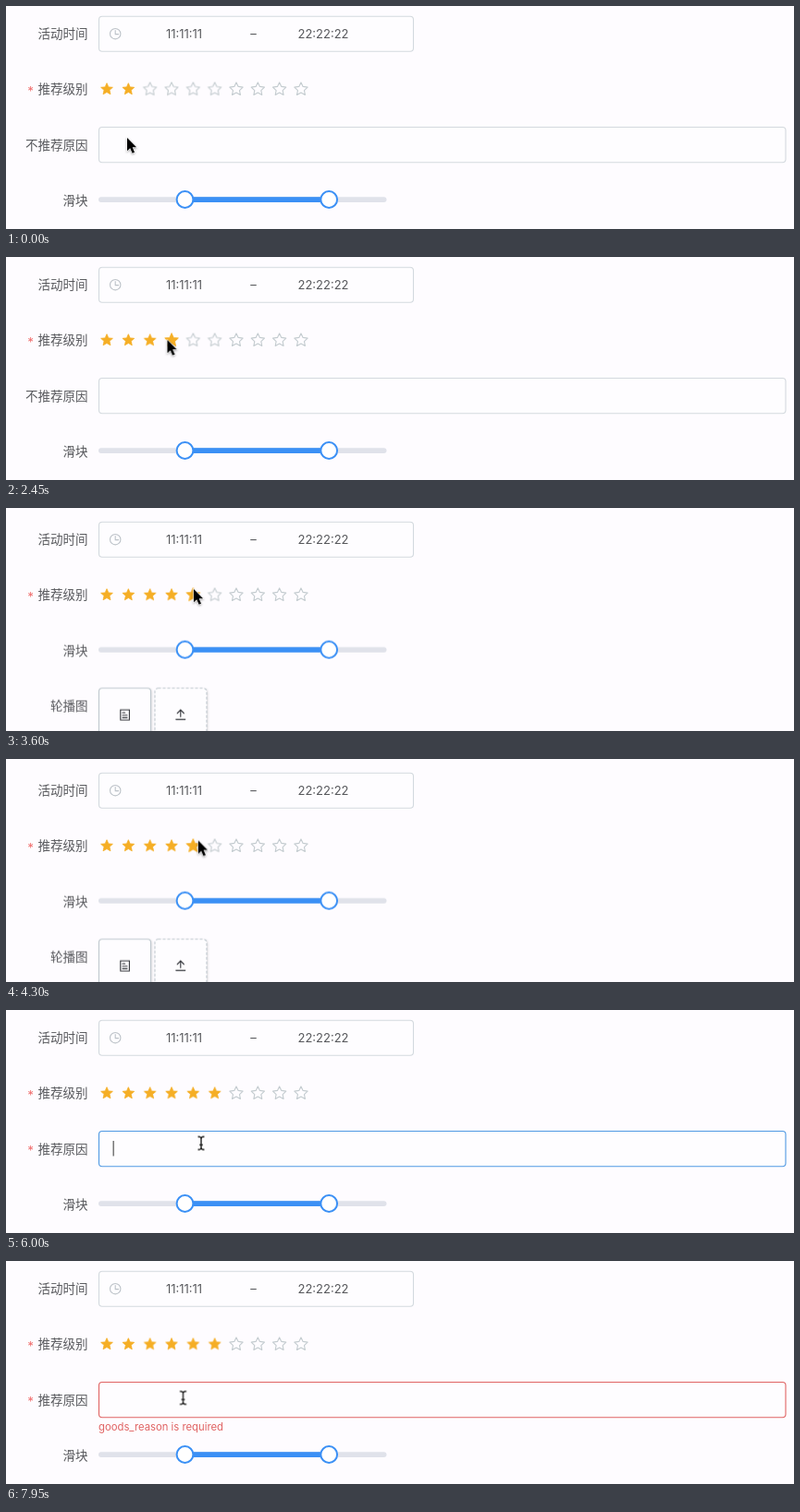
These frames come from a looping animation (852 by 242 pixels, 8 s). An HTML page:

```html
<!DOCTYPE html>
<html lang="zh-CN">
<head>
<meta charset="utf-8">
<title>表单联动</title>
<style>
  html, body { margin: 0; width: 100%; height: 100%; overflow: hidden; background: #fefcff; }
  svg { display: block; }
  text { font-family: Inter, "Noto Sans CJK SC", "Noto Sans CJK", sans-serif; font-size: 13.5px; fill: #57585c; }
  .label { text-anchor: end; font-family: "Noto Sans CJK SC", "Noto Sans CJK", sans-serif; }
  .time { text-anchor: middle; font-size: 13px; }
  .must { fill: #f07070; }
  .box { fill: #fefdff; stroke: #d3d9de; stroke-width: 1.1; }
  .icon { fill: none; stroke: #bcc2c8; stroke-width: 1.1; stroke-linecap: round; }
  .dark { stroke: #33353a; }
  .off { fill: none; stroke: #c3cbcf; stroke-width: 1.1; stroke-linejoin: round; }
  .on { fill: #f5ae25; stroke: #f5ae25; stroke-width: .8; stroke-linejoin: round; }
  .knob { fill: #fff; stroke: #3b90f5; stroke-width: 2; }
  .card { fill: #fefdff; stroke: #bfc8ce; stroke-width: 1.1; filter: drop-shadow(1px 1px 1px #0002); }

  /* Discrete states */
  .form, .below, .cards, .reason, .low, .high, .caret, .arrow, .beam { animation: 8s step-end infinite; }
  .form { animation-name: scroll; }
  .below { animation-name: lift; }
  .cards { animation-name: cards; }
  .reason { animation-name: reason; }
  .low { animation-name: low; }
  .high { animation-name: high; }
  .caret { animation-name: caret; }
  .arrow { animation-name: arrow; }
  .beam { animation-name: beam; }
  @keyframes scroll { 0%, 56.25%, 100% { transform: none; } 43.75% { transform: translateY(4px); } }
  @keyframes lift { 0%, 56.25%, 100% { transform: none; } 43.75% { transform: translateY(-60.3px); } }
  @keyframes cards { 0%, 56.25%, 100% { opacity: 0; } 43.75% { opacity: 1; } }
  @keyframes reason { 0%, 56.25%, 100% { opacity: 1; } 43.75% { opacity: 0; } }
  @keyframes low { 0% { opacity: 1; } 43.75%, 100% { opacity: 0; } }
  @keyframes high { 0% { opacity: 0; } 56.25%, 100% { opacity: 1; } }
  @keyframes caret { 0%, 78.125%, 100% { opacity: 0; } 71.875% { opacity: 1; } }
  @keyframes arrow { 0%, 81% { opacity: 1; } 68.75%, 91.75%, 100% { opacity: 0; } }
  @keyframes beam { 0%, 81% { opacity: 0; } 68.75%, 91.75%, 100% { opacity: 1; } }

  /* Eased motion */
  .field { animation: border 8s ease infinite; }
  @keyframes border {
    0%, 71.5% { stroke: #d3d9de; }
    74%, 83.6% { stroke: #4f99e3; }
    86%, 100% { stroke: #e06363; }
  }
  .error { fill: #e06363; font-size: 11.3px; transform-origin: 0 170px;
    animation: error 8s cubic-bezier(.23, 1, .32, 1) infinite; }
  @keyframes error {
    0%, 84.25% { transform: scaleY(0); opacity: 0; }
    88%, 100% { transform: none; opacity: 1; }
  }
  .pointer { animation: pointer 8s ease-in-out infinite; }
  @keyframes pointer {
    0% { transform: translate(131px, 143px); }
    4.375%, 6.25% { transform: translate(157px, 91px); }
    9.375%, 20.625% { transform: translate(152px, 90px); }
    30%, 38.75% { transform: translate(174.5px, 90px); }
    43.125%, 52.5% { transform: translate(203px, 88px); }
    56.25%, 63.125% { transform: translate(223.5px, 90px); }
    65.625%, 67.5% { transform: translate(219px, 131px); }
    71.875%, 78.75% { transform: translate(211px, 144.5px); }
    83.125%, 89.375% { transform: translate(200px, 121px); }
    95%, 100% { transform: translate(191.5px, 148.5px); }
  }
</style>
</head>
<body>
<svg width="852" height="242" viewBox="0 0 852 242">
  <rect width="852" height="242" fill="#fefcff"/>
  <g class="form">
    <text class="label" x="88.5" y="35.2">活动时间</text>
    <rect class="box" x="100.5" y="11.2" width="340" height="38" rx="3.5"/>
    <g class="icon"><circle cx="118.2" cy="30.2" r="5.7"/><path d="M118.2 26.6v4h3.4"/></g>
    <text class="time" x="192.5" y="35">11:11:11</text>
    <text class="time" x="267.5" y="35">–</text>
    <text class="time" x="343" y="35">22:22:22</text>

    <text class="must" x="23.3" y="97">*</text>
    <text class="label" x="88.5" y="95.4">推荐级别</text>
    <g id="stars"></g>

    <g class="reason">
      <text class="label low" x="88.5" y="155.8">不推荐原因</text>
      <g class="high">
        <text class="must" x="23.3" y="157.3">*</text>
        <text class="label" x="88.5" y="155.8">推荐原因</text>
      </g>
      <rect class="box field" x="100.5" y="131.5" width="742.5" height="38.2" rx="3.5"/>
      <rect class="caret" x="115.6" y="142" width="1.1" height="16.5" fill="#444"/>
      <text class="error" x="100" y="184">goods_reason is required</text>
    </g>

    <g class="below">
      <text class="label" x="88.5" y="216">滑块</text>
      <rect x="100" y="207.2" width="311.5" height="5.8" rx="2.9" fill="#e0e2ea"/>
      <rect x="193.5" y="207.2" width="155.7" height="5.8" fill="#3b90f5"/>
      <circle class="knob" cx="193.5" cy="210" r="8.9"/>
      <circle class="knob" cx="349.2" cy="210" r="8.9"/>
      <g class="cards">
        <text class="label" x="88.5" y="276.4">轮播图</text>
        <rect class="card" x="100.5" y="251.8" width="56" height="56" rx="3.5"/>
        <rect class="card" x="161" y="251.8" width="56" height="56" rx="3.5" stroke-dasharray="3 2"/>
        <g class="icon dark">
          <path d="M123.8 275.3h9.6v10.9h-9.6zM126 278.2h2.6M126 281h5M126 283.6h5"/>
          <path d="M188.8 282.8v-7.4M185.2 279l3.6-3.7 3.6 3.7M183.8 285.6h10"/>
        </g>
      </g>
    </g>
  </g>

  <g class="pointer">
    <path class="arrow" d="M0 0V14.2L3.2 11.2 5.6 16.7 8 15.7 5.7 10.3H10.1Z" fill="#000" stroke="#fff"
      stroke-width="1.1" paint-order="stroke" style="filter: drop-shadow(0 1px 1px #0005)"/>
    <g class="beam" fill="none" stroke-linecap="round">
      <path id="beam" d="M-3 -7Q0 -7 0 -5Q0 -7 3 -7M0 -5V5M-3 7Q0 7 0 5Q0 7 3 7M-1.5 1.8H1.5" stroke="#fff" stroke-width="2.6"/>
      <use href="#beam" style="display: none"/>
      <path d="M-3 -7Q0 -7 0 -5Q0 -7 3 -7M0 -5V5M-3 7Q0 7 0 5Q0 7 3 7M-1.5 1.8H1.5" stroke="#111" stroke-width="1.3"/>
    </g>
  </g>
</svg>
<script>
  const LOOP = 8000;
  const stars = document.getElementById('stars');
  // Hover start times of the third to sixth star, then the moment of leaving.
  const enter = [1700, 2100, 3300, 4380, 5150];

  function make(tag, attrs, parent) {
    const el = document.createElementNS('http://www.w3.org/2000/svg', tag);
    for (const key in attrs) el.setAttribute(key, attrs[key]);
    return parent.appendChild(el);
  }

  function starPoints(outer, inner) {
    return Array.from({ length: 10 }, (_, i) => {
      const r = i % 2 ? inner : outer;
      const a = i * Math.PI / 5 - Math.PI / 2;
      return (r * Math.cos(a)).toFixed(2) + ',' + (r * Math.sin(a)).toFixed(2);
    }).join(' ');
  }

  function loop(el, frames) {
    el.animate(frames.map(([time, style]) => ({ offset: time / LOOP, ...style })),
      { duration: LOOP, iterations: Infinity });
  }

  function toggle(el, time, before, after) {
    loop(el, [[0, { opacity: before }], [time, { opacity: before }],
      [time, { opacity: after }], [LOOP, { opacity: after }]]);
  }

  for (let i = 0; i < 10; i++) {
    const place = make('g', { transform: `translate(${109 + i * 23.33} 90.4)` }, stars);
    const star = make('g', {}, place);
    const off = i > 1 && make('polygon', { class: 'off', points: starPoints(7.5, 3.7) }, star);
    const on = i < 6 && make('polygon', { class: 'on', points: starPoints(6.7, 3.1) }, star);
    if (!off || !on) continue;

    const start = enter[i - 2], end = enter[i - 1];
    toggle(off, start, 1, 0);
    toggle(on, start, 0, 1);
    const small = { transform: 'scale(1)', easing: 'ease' };
    const big = { transform: 'scale(1.15)', easing: 'ease' };
    loop(star, [[0, small], [start, small], [start + 300, big],
      [end, big], [end + 300, small], [LOOP, small]]);
  }
</script>
</body>
</html>
```
